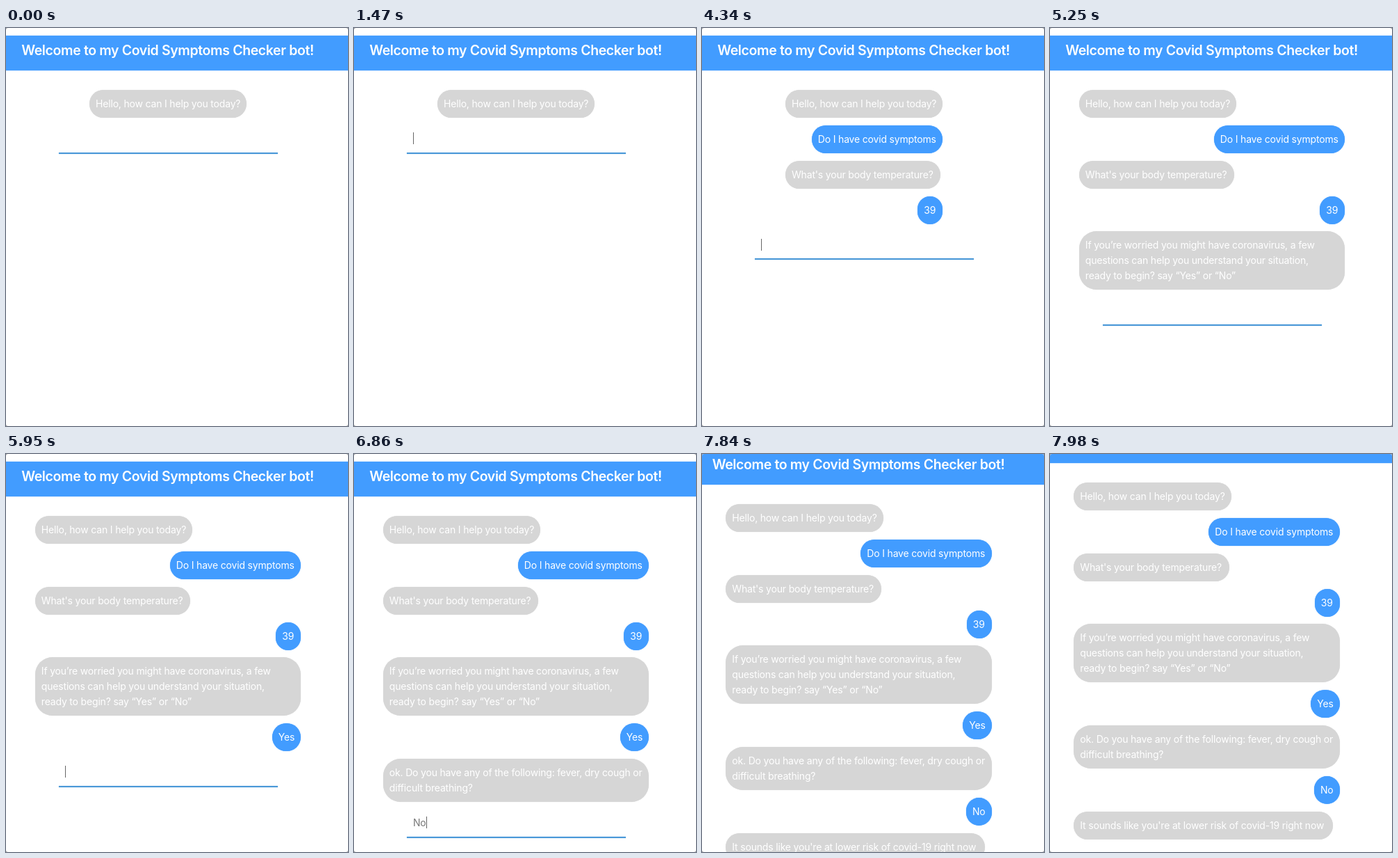
Recreate the animation shown at these times as an HTML page. Size 492 px wide and 572 px high, loop 8 s.

```html
<!DOCTYPE html>
<html lang="en">
<head>
<meta charset="utf-8">
<title>Symptoms checker chat</title>
<style>
  html, body { margin: 0; width: 100%; height: 100%; overflow: hidden; background: #999; }
  #stage {
    position: relative; width: 492px; height: 572px; overflow: hidden;
    background: #fff; border-radius: 3px;
    font: 14px/22px Inter, "Open Sans", sans-serif; letter-spacing: -.18px; white-space: pre;
  }
  #page, #page > div { position: absolute; }
  #page .bar { left: -20px; top: 11px; width: 540px; height: 50px; color: #429cff; }
  #page .title {
    left: 0; top: 21px; width: 465px; display: flex; justify-content: center;
    color: #fff; font-size: 19.5px; font-weight: 600; letter-spacing: -.38px;
  }
  .bubble { box-sizing: border-box; padding: 9px; color: #d6d6d6; }
  .bubble.user { color: #429cff; }
  .bubble span { color: #fff; }
  .bar, .bubble, #line { background: currentColor; box-shadow: 0 0 1px currentColor; }
  #field { left: 85px; height: 17px; display: flex; line-height: 17px; color: #777; }
  #caret { width: 1px; height: 17px; background: #666; }
  #line { left: 76px; width: 315px; height: 2px; color: #4a98d8; }
</style>
</head>
<body>
<div id="stage"><div id="page">
  <div class="bar"></div>
  <div class="title">Welcome to my Covid Symptoms Checker bot!</div>
  <div id="field"><span id="typed"></span><span id="caret"></span></div>
  <div id="line"></div>
</div></div>
<script>
const LOOP = 8000, TICK = 70, GAP = 10.8;
const WIDE_AT = 4480, OVERFLOW_AT = 7070, SCROLL_AT = 7763, SCROLL_SPEED = 0.221;

const messages = [
  { at: 0, width: 226.4, text: "Hello, how can I help you today?" },
  { at: 2100, width: 188.6, user: true, text: "Do I have covid symptoms" },
  { at: 2450, width: 223.4, text: "What's your body temperature?" },
  { at: 4200, width: 36.2, user: true, text: "39" },
  { at: WIDE_AT, width: 382.6, text: "If you’re worried you might have coronavirus, a few\nquestions can help you understand your situation,\nready to begin? say “Yes” or “No”" },
  { at: 5950, width: 41.6, user: true, text: "Yes" },
  { at: 6230, width: 382.6, text: "ok. Do you have any of the following: fever, dry cough or\ndifficult breathing?" },
  { at: OVERFLOW_AT, width: 37, user: true, text: "No" },
  { at: 7350, width: 372.7, text: "It sounds like you're at lower risk of covid-19 right now" }
];

// [time, field content]
const typing = [
  [0, ""], [1820, "Do I have covid symptoms"], [2100, ""],
  [3780, "3"], [3920, "39"], [4200, ""],
  [5460, "Y"], [5670, "Ye"], [5810, "Yes"], [5950, ""],
  [6580, "N"], [6790, "No"], [OVERFLOW_AT, ""]
];
const caretOn = [[1470, 2730], [3220, 4760], [5320, LOOP]];

const byId = id => document.getElementById(id);
const page = byId("page"), field = byId("field"), line = byId("line");
const typed = byId("typed"), caret = byId("caret");

let nextTop = 89.2;
for (const message of messages) {
  const height = 22 * message.text.split("\n").length + 18;
  const bubble = message.element = document.createElement("div");
  bubble.className = message.user ? "bubble user" : "bubble";
  const label = document.createElement("span");
  label.textContent = message.text;
  bubble.append(label);
  Object.assign(bubble.style, {
    top: Math.round(nextTop) + "px",
    width: message.width + "px",
    height: height + "px",
    borderRadius: Math.min(25, message.width / 2, height / 2) + "px"
  });
  page.append(bubble);
  message.bottom = nextTop + height;
  nextTop += height + GAP;
}

function render(time) {
  const t = Math.floor(time / TICK) * TICK;
  const [left, right] = t < WIDE_AT ? [120, 346.4] : [41.8, 424.4];
  let bottom = 0;
  for (const { at, user, width, element, bottom: end } of messages) {
    const shown = t >= at;
    element.style.display = shown ? "block" : "none";
    element.style.left = (user ? right - width : left) + "px";
    if (shown) bottom = end;
  }
  typed.textContent = typing.filter(([at]) => t >= at).pop()[1];
  caret.style.visibility = caretOn.some(([from, to]) => t >= from && t < to) ? "visible" : "hidden";
  field.style.top = Math.round(bottom + 21) + "px";
  line.style.top = Math.round(bottom + 49.8) + "px";

  const scroll = Math.max(0, t - SCROLL_AT) * SCROLL_SPEED;
  page.style.top = -Math.round(scroll) + "px";
  page.style.left = t < OVERFLOW_AT ? "0" : "-7.5px";
}

function frame() {
  render(performance.now() % LOOP);
  requestAnimationFrame(frame);
}
frame();
</script>
</body>
</html>
```
